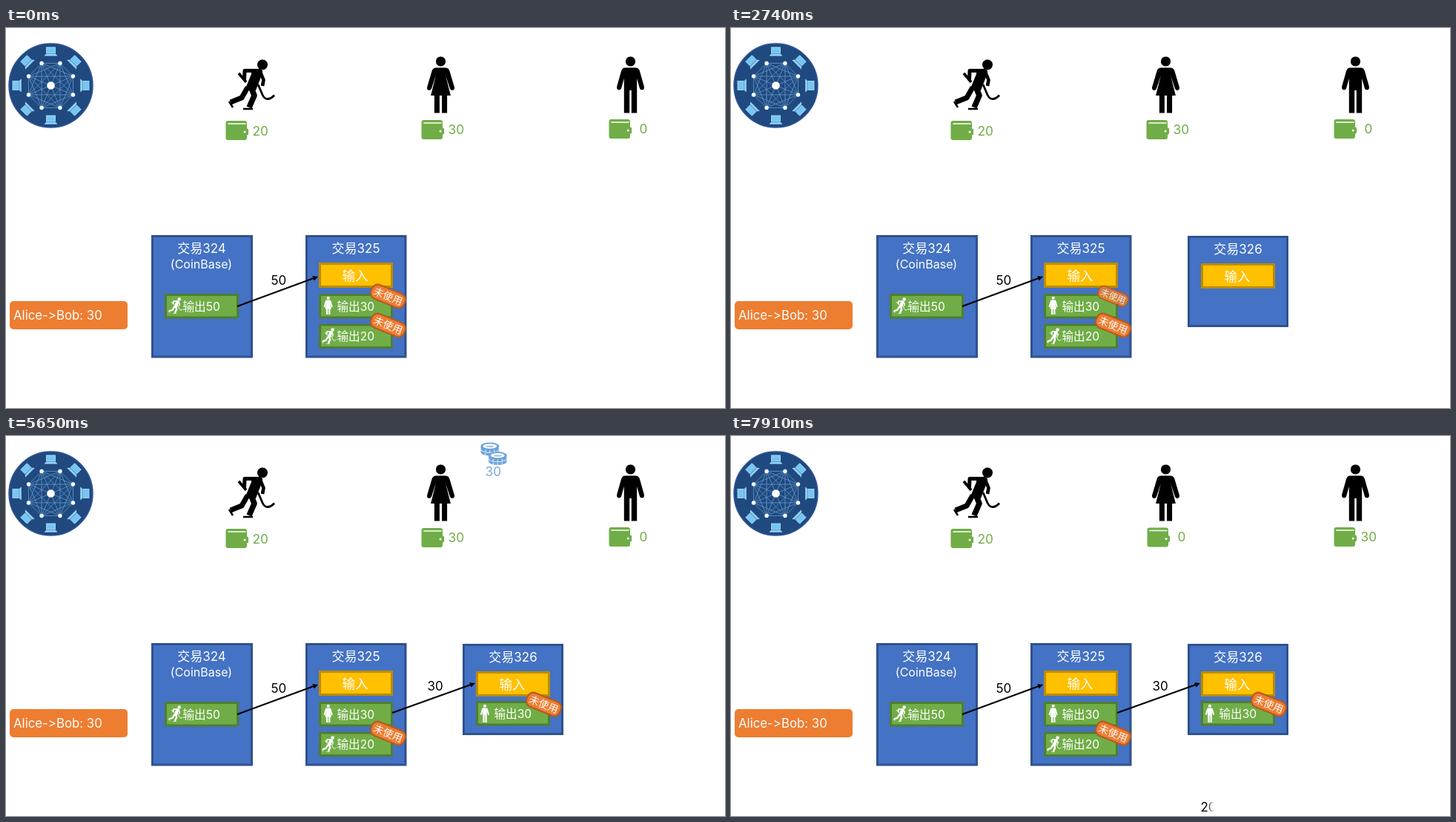
Animation of 970x512 px, one loop 8 s. Source, as an HTML page:

```html
<!DOCTYPE html>
<html lang="zh-CN">
<head>
<meta charset="utf-8">
<title>交易</title>
<style>
html, body { margin: 0; width: 100%; height: 100%; overflow: hidden; background: #fff; }
svg { display: block; width: 100%; height: 100%; }
text {
  font-family: Inter, "Noto Sans CJK SC", "Noto Sans CJK", sans-serif;
  font-variant-ligatures: none; font-feature-settings: "calt" 0, "liga" 0; white-space: pre;
}
</style>
</head>
<body>
<svg id="stage" viewBox="0 0 970 512" xmlns="http://www.w3.org/2000/svg"></svg>
<script>
const LOOP = 8000, TICK = 78.3, FIRST = 860;
const GREEN = '#70AD47', ORANGE = '#ED7D31', COIN = '#6BA2DA';

// ---- drawing helpers ----
const text = (x, y, s, size = 17, fill = '#fff', anchor = 'start') =>
  `<text x="${x}" y="${y}" font-size="${size}" fill="${fill}" text-anchor="${anchor}">${s}</text>`;
const box = (x, y, w, h, fill, stroke) =>
  `<rect x="${x + 1.5}" y="${y + 1.5}" width="${w - 3}" height="${h - 3}" fill="${fill}" stroke="${stroke}" stroke-width="3"/>`;
const at = (x, y, body, scale = 1) => `<g transform="translate(${x} ${y}) scale(${scale})">${body}</g>`;
const group = (id, body) => `<g id="${id}">${body}</g>`;

const block = (x, y, w, h, title) => box(x, y, w, h, '#4472C4', '#2F528F') + text(x + 68, y + 23.5, title, 17, '#fff', 'middle');
const input = (x, y) => box(x, y, 100, 34, '#FFC000', '#BC8C00') + text(x + 49, y + 24, '输入', 17.5, '#fff', 'middle');
const output = (x, y, sum) => box(x, y, 100, 33.5, GREEN, '#507E32') + text(x + 24.5, y + 22.5, '输出' + sum, 15.6);

const badge = id => group(id, `<g transform="rotate(22)">
  <rect x="-24" y="-10" width="48" height="20" rx="8" fill="${ORANGE}" stroke="#B55A1E" stroke-width="2"/>
  ${text(0, 5, '未使用', 13.6, '#fff', 'middle')}</g>`);

function arrow(x1, y1, x2, y2) {
  const a = Math.atan2(y2 - y1, x2 - x1) * 180 / Math.PI;
  return `<path d="M${x1} ${y1}L${x2 - 3} ${y2 + 1}" stroke="#000" stroke-width="2"/>
    <path transform="translate(${x2} ${y2}) rotate(${a})" d="M0 0L-7 -3.4V3.4Z"/>`;
}

const wallet = (x, y) => at(x - .5, y, `
  <rect width="28.5" height="26" rx="3" fill="${GREEN}"/>
  <path d="M3.5 4H26.5" stroke="#fff" stroke-width="1.7" stroke-linecap="round"/>
  <rect x="20" y="10.5" width="10.6" height="9" rx="2" fill="${GREEN}"/>
  <circle cx="25.6" cy="15" r="1.5" fill="#fff"/>`);

// ---- figures ----
const mirror = d => `<circle cy="7" r="6.6"/><path d="${d}"/><path transform="scale(-1 1)" d="${d}"/>`;
const man = mirror('M.4 15.5H-7Q-11 15.5 -12.3 19.5L-18.4 41Q-18.8 45 -15.8 45.6Q-13 45.6 -12.3 43L-8.7 30V76.5H-1.3V46H.4Z');
const woman = mirror('M.4 15.5H-6Q-10.4 15.5 -11.8 19.5L-18.5 42Q-18.8 45.2 -16 46Q-13.4 46 -12.4 43.5L-6.6 26L-13.4 53H-8.6V76.5H-1.6V53H.4Z');
const runner = col => `<g fill="none" stroke="${col}" stroke-linejoin="round">
  <circle cx="46" cy="7.5" r="7" fill="${col}" stroke="none"/>
  <path d="M31 13H42Q47 14 46 19L37 42H22L31 20Z" fill="${col}" stroke="none"/>
  <path d="M38 15.5H22L21.5 28" stroke-width="5"/>
  <path d="M14 19L24 31" stroke-width="3.6"/>
  <path d="M43 17L47.5 28L46 36" stroke-width="4.6"/>
  <path d="M40 34L46 48Q49 54.5 54 53.5Q58 53 62 48.5" stroke-width="2.8"/>
  <path d="M26 38L18 52L3 58" stroke-width="7"/>
  <path d="M31 39L35 49L28 65" stroke-width="7.6"/>
  <path d="M1 57L6 65M20 67H33" stroke-width="2.6"/></g>`;

// ---- round network emblem ----
const polar = (r, deg) => [r * Math.sin(deg * Math.PI / 180), -r * Math.cos(deg * Math.PI / 180)];
function network() {
  const nodes = [...Array(8)].map((_, i) => polar(32.5, 22.5 + 45 * i));
  let lines = '', dots = '', pcs = '';
  nodes.forEach(([x, y], i) => {
    for (const [u, v] of nodes.slice(i + 1)) lines += `M${x} ${y}L${u} ${v}`;
    dots += `<circle cx="${x}" cy="${y}" r="2.7"/>`;
    const [px, py] = polar(46, 45 * i), turn = i === 4 ? 0 : 45 * i;
    pcs += `<g transform="translate(${px} ${py}) rotate(${turn})">
      <rect x="-6" y="-5.5" width="12" height="8" fill="#74C6F5" stroke="#B9E2FA" stroke-width=".8"/>
      <path d="M-6.5 3.3H6.5L9 6.3H-9Z" fill="#8FD0F7"/></g>`;
  });
  return `<circle r="56.5" fill="#1F497F" stroke="#2F5597" stroke-width="1.5"/>
    <path d="${lines}" stroke="#7DB4E6" stroke-width=".75" opacity=".8"/>
    <g fill="#fff">${dots}<circle r="5.3"/></g>${pcs}`;
}

// ---- coins ----
function pile(x, y) {
  let s = '';
  for (const c of [y + 4.6, y]) {
    s += `<path d="M${x - 12.5} ${c}v3.6a12.5 5 0 0 0 25 0v-3.6z" fill="${COIN}" stroke="#fff" stroke-width=".8"/>
      <path d="M${x - 6} ${c + 4.6}v3M${x} ${c + 5.4}v3M${x + 6} ${c + 4.6}v3" stroke="#fff" stroke-width=".9"/>`;
  }
  return s + `<ellipse cx="${x}" cy="${y}" rx="12.4" ry="5" fill="${COIN}"/>
    <ellipse cx="${x}" cy="${y}" rx="9.4" ry="3.2" fill="#fff"/>
    <ellipse cx="${x}" cy="${y + .3}" rx="5.6" ry="1.4" fill="#A9C9EB"/>`;
}
const coins = pile(-5, -20) + pile(5.5, -7.5) + text(-.5, 20.5, '30', 17.3, '#7BA9DB', 'middle');

// ---- soft left-to-right wipes: id, left, width, feather, start, length ----
const wipes = [
  ['block', 616, 136, 20, 785, 500],
  ['input', 634, 100, 20, 1300, 499],
  ['link', 520, 114, 20, 2720, 480],
  ['output', 634, 100, 20, 4338, 500],
  ['next', 634, 22, 10, 7829, 140]
];
const defs = wipes.map(([id]) => `
  <linearGradient id="${id}Edge" gradientUnits="userSpaceOnUse" y1="0" y2="0">
    <stop offset="0" stop-color="#fff"/><stop offset="1" stop-color="#000"/></linearGradient>
  <mask id="${id}Mask" maskUnits="userSpaceOnUse" x="0" y="0" width="970" height="512">
    <rect width="970" height="512" fill="url(#${id}Edge)"/></mask>`).join('');
const wiped = (id, body) => `<g mask="url(#${id}Mask)">${body}</g>`;
const small = (x, y, fig) => `<g fill="#fff">${at(x, y, fig, .32)}</g>`;

document.getElementById('stage').innerHTML = `<defs>${defs}</defs>
  ${at(60.5, 77.5, network())}
  ${at(300, 42, runner('#000'))}${at(586.5, 38, woman)}${at(842.5, 38, man)}
  ${wallet(297, 125)}${text(332.5, 145, '20', 17.3, GREEN)}
  ${group('herOld', wallet(561, 124) + text(596.5, 143, '30', 17.3, GREEN))}
  ${group('herNew', wallet(562, 123.5) + text(602.5, 142, '0', 17.3, GREEN))}
  ${wallet(814, 123)}
  ${group('hisOld', text(854.5, 142, '0', 17.3, GREEN))}
  ${group('hisNew', text(849.5, 142, '30', 17.3, GREEN))}
  <rect x="5" y="368" width="159" height="38" rx="5" fill="${ORANGE}"/>
  ${text(10, 393, 'Alice-&gt;Bob: 30', 16.8)}
  ${block(196, 279, 137, 165.5, '交易324')}${text(263.5, 324, '(CoinBase)', 16, '#fff', 'middle')}
  ${output(214, 358, 50)}${small(219, 363, runner('#fff'))}
  ${block(404, 279, 136.5, 165.5, '交易325')}${input(422, 316)}
  ${output(422, 358, 30)}${small(434.7, 361.5, woman)}
  ${output(422, 398.5, 20)}${small(426, 404, runner('#fff'))}
  ${arrow(312, 375, 421, 335)}${text(357.5, 346, '50', 17, '#000')}
  ${at(515.5, 361.5, badge('spent'))}${at(515.5, 400.5, badge('change'))}
  ${wiped('block', block(616, 280, 136, 123, '交易326'))}
  ${wiped('input', input(634, 317))}
  ${wiped('link', arrow(521, 373, 633, 333) + text(568.5, 343, '30', 17, '#000'))}
  ${wiped('output', output(634, 357, 30) + small(646, 361.5, man))}
  ${at(725.5, 361.5, badge('fresh'))}
  ${wiped('next', text(633.5, 506, '20', 17, '#000'))}
  ${group('coins', coins)}`;

// ---- animation ----
const el = id => document.getElementById(id);
const prog = (t, start, len) => Math.min(1, Math.max(0, (t - start) / len));
const set = (id, opacity, transform) => {
  el(id).setAttribute('opacity', opacity);
  if (transform) el(id).setAttribute('transform', transform);
};

function draw(ms) {
  // pictures advance in even ticks
  const t = FIRST + Math.min(90, Math.floor((ms - FIRST) / TICK)) * TICK;

  for (const [id, x, w, soft, start, len] of wipes) {
    const edge = x + prog(t, start, len) * (w + soft);
    el(id + 'Edge').setAttribute('x1', edge - soft);
    el(id + 'Edge').setAttribute('x2', edge);
  }

  const spent = 1 - prog(t, 2675, 500);
  set('spent', spent, `scale(${spent})`);
  set('fresh', prog(t, 4310, 500));

  // coins grow, arc across, then shrink
  const p = (1 - Math.cos(Math.PI * prog(t, 5160, 1379))) / 2;
  const size = prog(t, 4840, 500) * (1 - prog(t, 6400, 410));
  const x = 589 + 258 * p, y = 57 + 4 * p - 124 * p * (1 - p);
  set('coins', size, `translate(${x} ${y}) scale(${size})`);

  const swap = prog(t, 6320, 490);
  set('herOld', 1 - swap);
  set('herNew', swap);
  set('hisOld', 1 - swap);
  set('hisNew', swap);
}

let begin;
function frame(now) {
  begin ??= now;
  draw((now - begin) % LOOP);
  requestAnimationFrame(frame);
}
draw(0);
requestAnimationFrame(frame);
</script>
</body>
</html>
```
